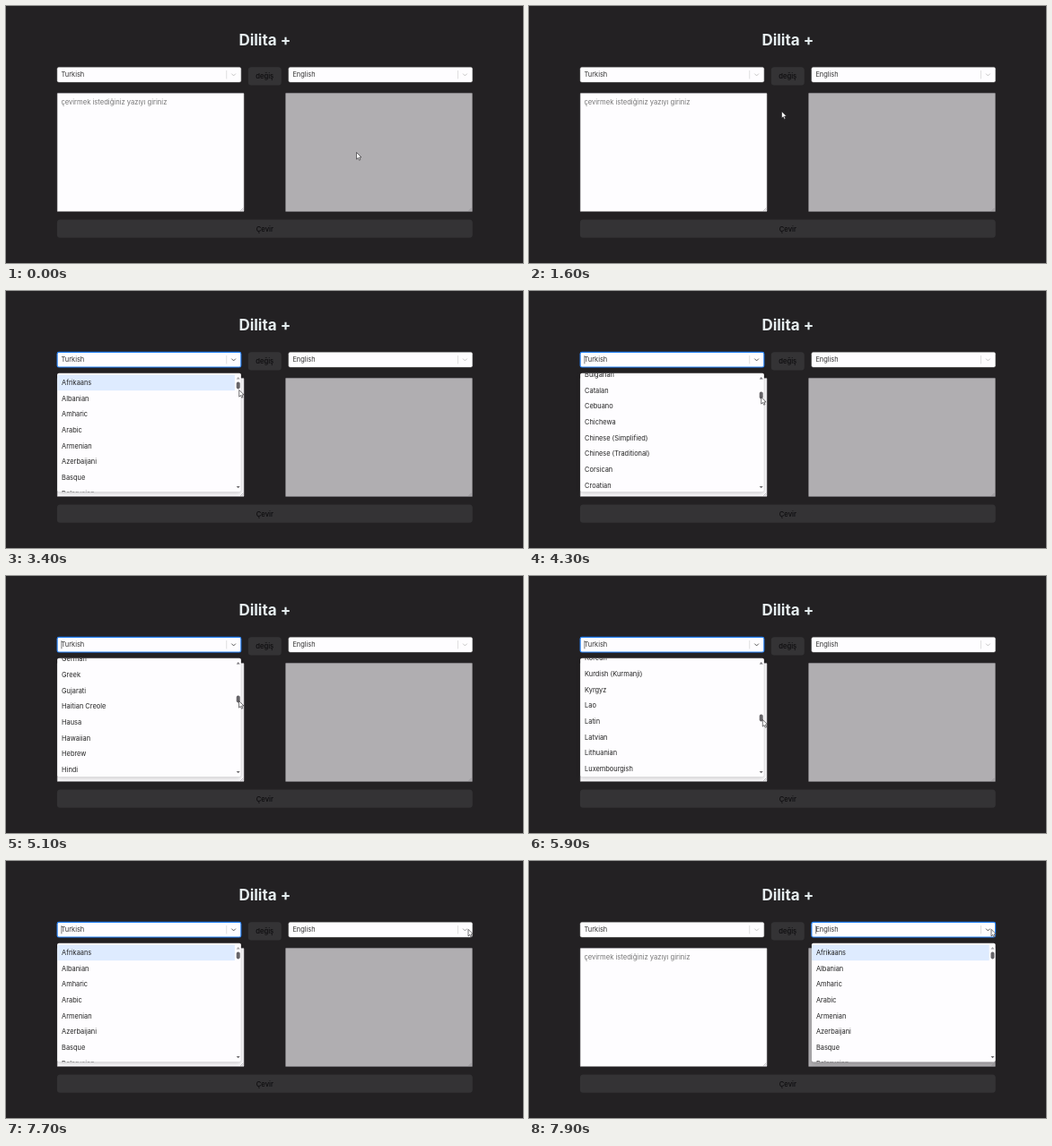
These frames come from a looping animation (576 by 287 pixels, 8 s). An HTML page with a canvas:

```html
<!DOCTYPE html>
<html lang="tr">
<head>
<meta charset="utf-8">
<title>Dilita +</title>
<style>
html, body { margin: 0; width: 100%; height: 100%; overflow: hidden; background: #232123; }
canvas { display: block; width: 576px; height: 287px; }
</style>
</head>
<body>
<canvas id="stage"></canvas>
<script>
const W = 576, H = 287, LOOP = 8000, STEP = 100;
const FONT = 'Inter, "Open Sans", sans-serif';
const ROW = 17.65;
const MENU = { top: 91.8, bottom: 224.4 };
const SCROLL_RATIO = 16.85;
const GRAB_Y = 107.5, GRAB_AT = 3775, SNAP_X = 325;
const LEFT_OPEN = 2600, RIGHT_OPEN = 7900;
const BLINK = 530, BLINK_STARTS = [2600, 3775, 6600, 7900];

const LANGS = ('Afrikaans,Albanian,Amharic,Arabic,Armenian,Azerbaijani,Basque,Belarusian,' +
  'Bengali,Bosnian,Bulgarian,Catalan,Cebuano,Chichewa,Chinese (Simplified),' +
  'Chinese (Traditional),Corsican,Croatian,Czech,Danish,Dutch,English,Esperanto,' +
  'Estonian,Filipino,Finnish,French,Frisian,Galician,Georgian,German,Greek,Gujarati,' +
  'Haitian Creole,Hausa,Hawaiian,Hebrew,Hindi,Hmong,Hungarian,Icelandic,Igbo,' +
  'Indonesian,Irish,Italian,Japanese,Javanese,Kannada,Kazakh,Khmer,Korean,' +
  'Kurdish (Kurmanji),Kyrgyz,Lao,Latin,Latvian,Lithuanian,Luxembourgish,Macedonian,' +
  'Malagasy,Malay,Malayalam,Maltese,Maori,Marathi,Mongolian,Myanmar,Nepali').split(',');

// time, x, y; the pointer eases between these, except while dragging
const PATH = [
  [0, 390.5, 163.5], [800, 390.5, 163.5], [1000, 384, 166.3], [1100, 384, 166.3],
  [1400, 281.5, 117.7], [1600, 281.5, 117.7], [2300, 254, 76], [2700, 254, 76],
  [3400, 259.7, 110.5], [3600, 258.7, GRAB_Y], [GRAB_AT, 258.7, GRAB_Y],
  [4300, 258.7, 118.5], [5900, 260.3, 160.5], [6200, 261, 164],
  [7000, 511, 78], [7500, 515, 76.3], [LOOP, 515, 76.3]
];

const canvas = document.getElementById('stage');
const ctx = canvas.getContext('2d');
const dpr = window.devicePixelRatio || 1;
canvas.width = W * dpr;
canvas.height = H * dpr;
ctx.scale(dpr, dpr);

function pointerAt(t) {
  const i = Math.max(1, PATH.findIndex(p => p[0] > t));
  const [t0, x0, y0] = PATH[i - 1], [t1, x1, y1] = PATH[i];
  let k = (t - t0) / (t1 - t0);
  const dragging = t0 >= GRAB_AT && t1 <= 6200;
  if (!dragging) k = k * k * (3 - 2 * k);
  return { x: x0 + (x1 - x0) * k, y: y0 + (y1 - y0) * k };
}

// The list follows the pointer until it strays too far from the scrollbar.
function scrollAt(t, p) {
  if (t < GRAB_AT || p.x > SNAP_X) return 0;
  return Math.max(0, (p.y - GRAB_Y) * SCROLL_RATIO);
}

function caretOn(t) {
  const start = BLINK_STARTS.filter(s => s <= t).pop();
  return Math.floor((t - start) / BLINK) % 2 === 0;
}

function box(x, y, w, h, r, fill, stroke, lw) {
  ctx.beginPath();
  ctx.roundRect(x, y, w, h, r);
  if (fill) { ctx.fillStyle = fill; ctx.fill(); }
  if (stroke) { ctx.strokeStyle = stroke; ctx.lineWidth = lw; ctx.stroke(); }
}

function text(s, x, y, size, color, align = 'left', weight = 400) {
  ctx.font = `${weight} ${size}px ${FONT}`;
  ctx.textAlign = align;
  ctx.fillStyle = color;
  ctx.fillText(s, x, y);
}

function line(points, color, lw) {
  ctx.beginPath();
  points.forEach(([x, y]) => ctx.lineTo(x, y));
  ctx.strokeStyle = color;
  ctx.lineWidth = lw;
  ctx.stroke();
}

function triangle(x, y, dy, color) {
  ctx.beginPath();
  ctx.moveTo(x - 2, y);
  ctx.lineTo(x + 2, y);
  ctx.lineTo(x, y + dy);
  ctx.fillStyle = color;
  ctx.fill();
}

function textarea(x, fill) {
  box(x, 97.3, 208, 132.2, 0.6, fill, '#858387', 0.45);
  line([[x + 204.2, 228.8], [x + 207.3, 225.7]], '#77757a', 0.5);
  line([[x + 206, 228.8], [x + 207.3, 227.5]], '#77757a', 0.5);
}

function select(x, value, focused, hover, caret) {
  box(x, 68.4, 204.7, 16.6, 1.8, '#fefdff', focused ? '#2684ff' : '#cccccc', focused ? 1.1 : 0.45);
  text(value, x + 4.5, 79.1, 7.4, '#333333');
  if (focused && caret) line([[x + 4.8, 72.2], [x + 4.8, 81.3]], '#222222', 0.6);
  line([[x + 188.6, 72], [x + 188.6, 81.4]], '#cccccc', 0.6);
  const c = x + 196.5;
  const color = focused ? '#555555' : hover ? '#999999' : '#c4c4c4';
  line([[c - 2.3, 75.6], [c, 77.9], [c + 2.3, 75.6]], color, 1);
}

function menu(x, scroll) {
  const { top, bottom } = MENU, w = 204.8, h = bottom - top;
  ctx.save();
  ctx.shadowColor = 'rgba(0,0,0,.2)';
  ctx.shadowBlur = 5 * dpr;
  ctx.shadowOffsetY = 1.8 * dpr;
  box(x, top, w, h, 1.8, '#fefdff', 'rgba(0,0,0,.12)', 0.5);
  ctx.restore();

  ctx.save();
  ctx.beginPath();
  ctx.rect(x, top, w, h);
  ctx.clip();
  LANGS.forEach((name, i) => {
    const y = 93.5 + i * ROW - scroll;
    if (y < top - ROW || y > bottom) return;
    if (i === 0) { ctx.fillStyle = '#deebff'; ctx.fillRect(x, y, w - 7, ROW); }
    text(name, x + 5, y + 11.5, 7.4, '#222222');
  });
  const c = x + 201.6;
  triangle(c, 98.4, -2.3, scroll ? '#77757a' : '#a3a2a5');
  triangle(c, 217.9, 2.3, '#6a686c');
  box(c - 2, 101.6 + scroll / SCROLL_RATIO, 4, 7.8, 1.8, '#666468');
  ctx.restore();
}

function pointer({ x, y }) {
  const shape = [[0, 0], [0, 7.6], [1.8, 6], [3, 8.7], [4.3, 8.1], [3.1, 5.5], [5.4, 5.4]];
  ctx.beginPath();
  shape.forEach(([dx, dy]) => ctx.lineTo(x + dx, y + dy));
  ctx.closePath();
  ctx.lineJoin = 'round';
  ctx.fillStyle = '#ffffff';
  ctx.fill();
  ctx.strokeStyle = '#1a191b';
  ctx.lineWidth = 0.6;
  ctx.stroke();
}

function draw(t) {
  const p = pointerAt(t);
  const leftOpen = t >= LEFT_OPEN && t < RIGHT_OPEN;
  const rightOpen = t >= RIGHT_OPEN;
  const caret = t >= LEFT_OPEN && caretOn(t);

  ctx.fillStyle = '#232123';
  ctx.fillRect(0, 0, W, H);
  text('Dilita +', 288.3, 43.7, 17, '#e6eef0', 'center', 700);

  select(57.1, 'Turkish', leftOpen, p.x > 249 && p.x < 262 && p.y < 85, caret);
  select(314.9, 'English', rightOpen, p.x > 505 && p.y < 85, caret);
  box(269.8, 68.2, 37, 20.4, 3.5, '#343335');
  text('değiş', 288.2, 81.2, 7.6, '#0d0c0e', 'center', 500);

  textarea(57.1, '#fefdff');
  text('çevirmek istediğiniz yazıyı giriniz', 61.4, 110.4, 7.6, '#757575');
  textarea(311.5, '#b0aeb1');
  box(56.9, 238.5, 462.9, 20.3, 3.5, '#343335');
  text('Çevir', 288.3, 251.6, 7.6, '#0d0c0e', 'center', 500);

  if (leftOpen) menu(57.1, scrollAt(t, p));
  if (rightOpen) menu(314.9, 0);
  pointer(p);
}

const start = performance.now();
function tick() {
  const t = (performance.now() - start) % LOOP;
  draw(Math.floor(t / STEP) * STEP);
  requestAnimationFrame(tick);
}
tick();
</script>
</body>
</html>
```
